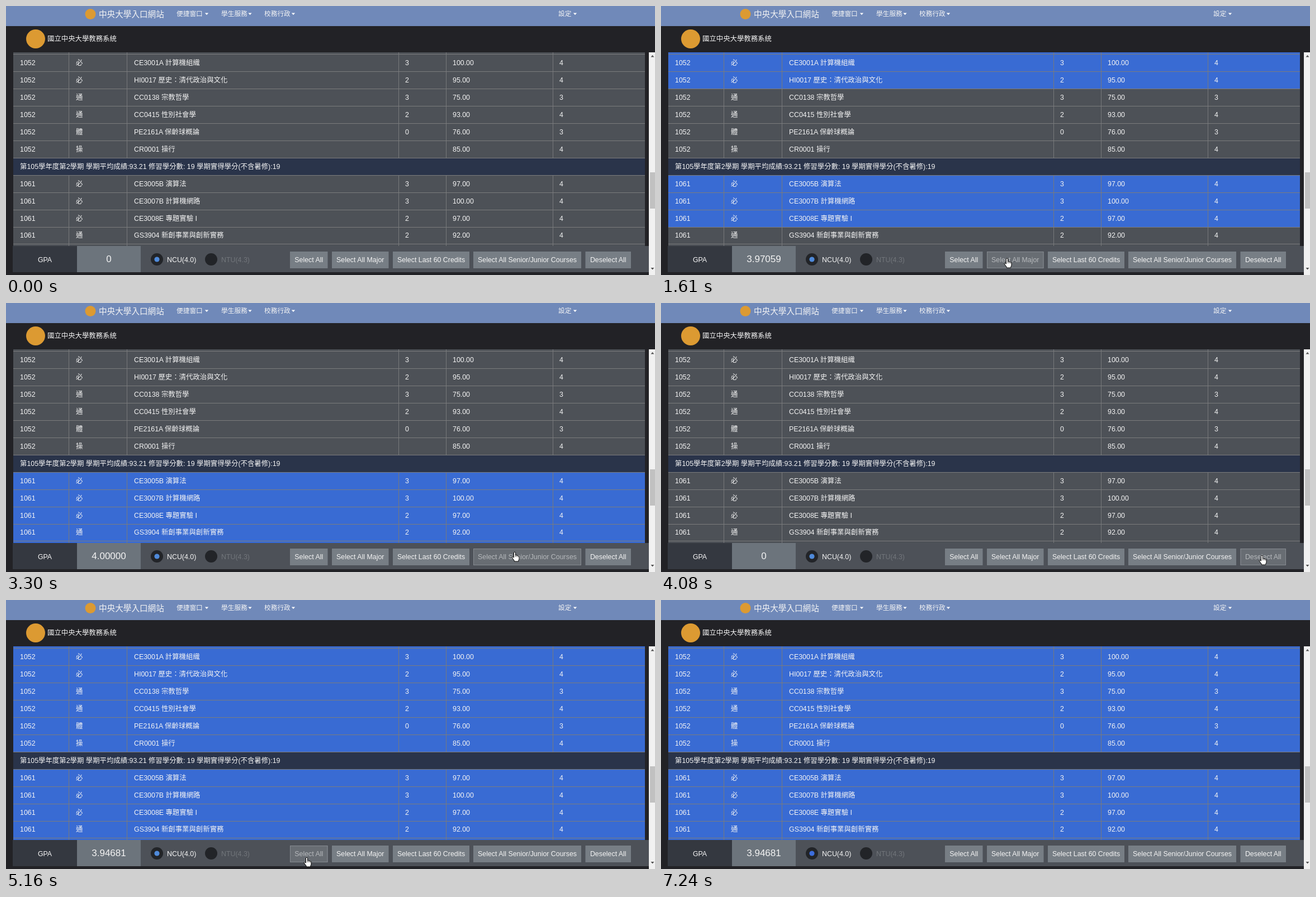
Write an HTML page that moves like this. It is 1161 px wide and 482 px high and loops after 8.33 s.

```html
<!DOCTYPE html>
<html lang="zh-Hant">
<head>
<meta charset="utf-8">
<style>
html, body { margin: 0; width: 100%; height: 100%; overflow: hidden; background: #222226; }
svg { display: block; width: 1161px; height: 482px; }
text { font: 12.4px "Liberation Sans", "Noto Sans CJK TC", "Noto Sans CJK JP", "Noto Sans CJK", sans-serif; fill: #f4f4f4; }
</style>
</head>
<body>
<script>
const LOOP = 8330;
const NS = 'http://www.w3.org/2000/svg';

function add(parent, tag, attrs, content) {
  const node = document.createElementNS(NS, tag);
  for (const key in attrs) node.setAttribute(key, attrs[key]);
  if (content !== undefined) node.textContent = content;
  parent.appendChild(node);
  return node;
}
const svg = add(document.body, 'svg', { viewBox: '0 0 1161 482' });
const rect = (x, y, width, height, fill, parent = svg) => add(parent, 'rect', { x, y, width, height, fill });
const path = (d, attrs, parent = svg) => add(parent, 'path', { d, ...attrs });
const circle = (cx, cy, r, fill) => add(svg, 'circle', { cx, cy, r, fill });
function label(x, y, str, size, anchor, parent = svg) {
  const node = add(parent, 'text', { x, y, 'text-anchor': anchor || 'start' }, str);
  if (size) node.style.fontSize = size + 'px';
  return node;
}

// Header
rect(0, 0, 1161, 482, '#222226');
rect(0, 0, 1161, 36, '#7089b9');
circle(151, 14.5, 9.5, '#dc9a32');
circle(53, 59, 17, '#dc9a32');
label(166, 20.3, '中央大學入口網站', 14.6);
label(74, 62.8, '國立中央大學教務系統');
[[305, '便捷窗口', 359], [385, '學生服務', 436.5], [462, '校務行政', 514], [988, '設定', 1018]].forEach(([x, str, caret]) => {
  label(x, 17.8, str, 11.7);
  path(`M${caret - 3.2} 12.6h6.4l-3.2 3.4z`, { fill: '#fff' });
});

// Score table
const COLS = [25, 125, 229, 714, 799, 990];
const ROWS = [
  ['1052', '必', '', '', '', ''],
  ['1052', '必', 'CE3001A 計算機組織', '3', '100.00', '4'],
  ['1052', '必', 'HI0017 歷史：清代政治與文化', '2', '95.00', '4'],
  ['1052', '通', 'CC0138 宗教哲學', '3', '75.00', '3'],
  ['1052', '通', 'CC0415 性別社會學', '2', '93.00', '4'],
  ['1052', '體', 'PE2161A 保齡球概論', '0', '76.00', '3'],
  ['1052', '操', 'CR0001 操行', '', '85.00', '4'],
  null,
  ['1061', '必', 'CE3005B 演算法', '3', '97.00', '4'],
  ['1061', '必', 'CE3007B 計算機網路', '3', '100.00', '4'],
  ['1061', '必', 'CE3008E 專題實驗 I', '2', '97.00', '4'],
  ['1061', '通', 'GS3904 新創事業與創新實務', '2', '92.00', '4'],
  ['1061', '通', '', '', '', '']
];
const PITCH = 30.95;
const lineY = i => 86.5 + (i - 1) * PITCH;
const snapY = y => Math.floor(y) + 0.5;

const clip = add(add(svg, 'defs', {}), 'clipPath', { id: 'view' });
rect(13, 83, 1130, 347, '#000', clip);
const table = add(svg, 'g', { 'clip-path': 'url(#view)' });
const rows = [];
ROWS.forEach((cells, i) => {
  const top = snapY(lineY(i)), bottom = snapY(lineY(i + 1));
  const base = (top + bottom) / 2 + 3.9;
  const bg = rect(13, top, 1130, bottom - top, cells ? '#4d5157' : '#2a344a', table);
  if (cells) {
    const texts = cells.map((str, c) => cells[2] ? label(COLS[c], base, str, 0, '', table) : null);
    path([112.5, 216.5, 702.5, 787.5, 978.5].map(x => `M${x} ${top}V${bottom}`).join(''), { stroke: '#77797b' }, table);
    rows.push({ cells, bg, grade: texts[5] });
  } else {
    label(25, base, '第105學年度第2學期 學期平均成績:93.21 修習學分數: 19 學期實得學分(不含暑修):19', 0, '', table);
  }
});
path(ROWS.map((_, i) => `M13 ${snapY(lineY(i))}H1143`).join(''), { stroke: '#7b7c7d' }, table);

// Scrollbar
rect(1150, 83, 11, 399, '#f1f1f1');
rect(1152, 298, 9, 65, '#c1c1c1');
path('M1153.5 91.5h6l-3-3.5z', { fill: '#505050' });
path('M1153.5 469h6l-3 3.5z', { fill: '#505050' });

// Bottom bar
rect(12, 430, 1138, 47, '#4d5158');
rect(12, 430, 115, 47, '#343840');
rect(127, 430, 114, 47, '#6c747c');
label(69.5, 458.6, 'GPA', 0, 'middle');
const gpa = label(184, 459, '0', 17, 'middle');
const radios = [[270, 288, 'NCU(4.0)'], [367, 385, 'NTU(4.3)']].map(([cx, x, str]) => {
  circle(cx, 454, 11, '#222428');
  return { dot: circle(cx, 454, 4.6, '#4f8ada'), text: label(x, 458.6, str) };
});

const buttons = [
  [508, 67.5, 'Select All'],
  [583, 101.5, 'Select All Major'],
  [692, 137, 'Select Last 60 Credits'],
  [836, 193, 'Select All Senior/Junior Courses'],
  [1036.5, 81.5, 'Deselect All']
].map(([x, w, str]) => {
  rect(x, 440, w, 30, '#777e85');
  label(x + w / 2, 458.6, str, 0, 'middle');
  const over = add(svg, 'g', { opacity: 0 });
  const box = rect(x + 0.5, 440.5, w - 1, 29, '#686d73', over);
  box.setAttribute('stroke', '#858a90');
  label(x + w / 2, 458.6, str, 0, 'middle', over).style.fill = '#b6b9bc';
  return { x, w, over };
});

// Hand pointer, tip at the origin
const hand = add(svg, 'g', {});
path('M-1.5 1Q0-.8 1.5 1V6Q3 5 4 6.5Q5.6 5.7 6.4 7.3Q8 6.9 8 8.7V12Q8 13.9 6.8 15.2V17H-.8V15.4Q-2.6 13.4-5 9.6Q-4.2 7.6-1.5 10Z',
  { fill: '#fff', stroke: '#000', 'stroke-linejoin': 'round' }, hand);
path('M1.5 6V9M4 6.8V9.2M6.3 7.5V9.5', { stroke: '#000', 'stroke-width': 0.7 }, hand);

// Bursts of screen updates: start, end, steps
const BURSTS = [
  [0, 0, 1], [440, 1210, 11], [1290, 1370, 2], [1520, 2150, 9], [2380, 2830, 7], [3210, 3680, 7],
  [4080, 4850, 11], [4930, 5700, 11], [6000, 6460, 7], [7010, 7240, 4]
];
// Pointer path: time, x, y
const MOVES = [
  [440, 566, 476], [671, 545, 456], [825, 545, 456], [1210, 615, 452], [1290, 617, 452], [1370, 619, 452],
  [1677, 619, 452], [2150, 760, 452], [2455, 760, 452], [2680, 880, 449], [2830, 910, 446],
  [3367, 910, 446], [3680, 1075, 452], [4157, 1075, 452], [4773, 571, 470], [4850, 545, 461],
  [5084, 545, 461], [5700, 380, 457], [6077, 380, 457], [6460, 272, 457], [7087, 272, 457], [7164, 272, 459]
];
const PICK = {
  none: () => false,
  all: () => true,
  major: c => c[1] === '必',
  recent: c => c[1] !== '體' && c[1] !== '操',
  senior: c => c[0] === '1061'
};
// Clicks: time, selection, average, 4.3 scale
const CLICKS = [
  [0, 'none', '0', 0], [748, 'all', '3.94681', 0], [1520, 'major', '3.97059', 0],
  [2380, 'recent', '3.95161', 0], [3210, 'senior', '4.00000', 0], [4080, 'none', '0', 0],
  [4930, 'all', '3.94681', 0], [6000, 'all', '4.22340', 1], [7010, 'all', '3.94681', 0]
];

const lastBefore = (list, t) => list.filter(item => item[0] <= t).pop();

function snap(t) {
  const [a, b, n] = lastBefore(BURSTS, t);
  if (n < 2 || t >= b) return b;
  const d = (b - a) / (n - 1);
  return Math.min(b, a + Math.floor((t - a + 8) / d) * d);
}

function pointer(t) {
  if (t < 440 || t >= 7240) return null;
  const i = MOVES.filter(m => m[0] <= t + 1).length - 1;
  const p = MOVES[i], q = MOVES[i + 1] || p;
  const u = q === p ? 0 : Math.max(0, (t - p[0]) / (q[0] - p[0]));
  const e = u * u * (3 - 2 * u);
  return [p[1] + (q[1] - p[1]) * e, p[2] + (q[2] - p[2]) * e];
}

const within = (p, x, w) => p && p[0] >= x && p[0] <= x + w && p[1] >= 440 && p[1] < 469.5 ? 1 : 0;

function scale43(score) {
  return score >= 90 ? '4.3' : score >= 85 ? '4' : '3';
}

function draw(time) {
  const t = snap(time);
  const [, pick, average, ntu] = lastBefore(CLICKS, t + 1);
  for (const { cells, bg, grade } of rows) {
    bg.setAttribute('fill', PICK[pick](cells) ? '#396bd3' : '#4d5157');
    if (grade) grade.textContent = ntu ? scale43(+cells[4]) : cells[5];
  }
  gpa.textContent = average;

  const now = pointer(t), before = pointer(snap(Math.max(0, time - 80)));
  radios.forEach(({ dot, text }, i) => {
    const on = i === ntu;
    dot.setAttribute('opacity', on ? 1 : 0);
    dot.setAttribute('fill', t >= 7010 ? '#3c6ddc' : '#4f8ada');
    text.style.fill = on ? '#f4f4f4' : within(now, i ? 356 : 259, 80) ? '#64686d' : '#72767b';
  });
  for (const { x, w, over } of buttons) {
    over.setAttribute('opacity', (within(now, x, w) + within(before, x, w)) / 2);
  }
  hand.setAttribute('visibility', now ? 'visible' : 'hidden');
  if (now) hand.setAttribute('transform', `translate(${Math.round(now[0])} ${Math.round(now[1])})`);
}

const start = performance.now();
function tick() {
  draw((performance.now() - start) % LOOP);
  requestAnimationFrame(tick);
}
tick();
</script>
</body>
</html>
```
